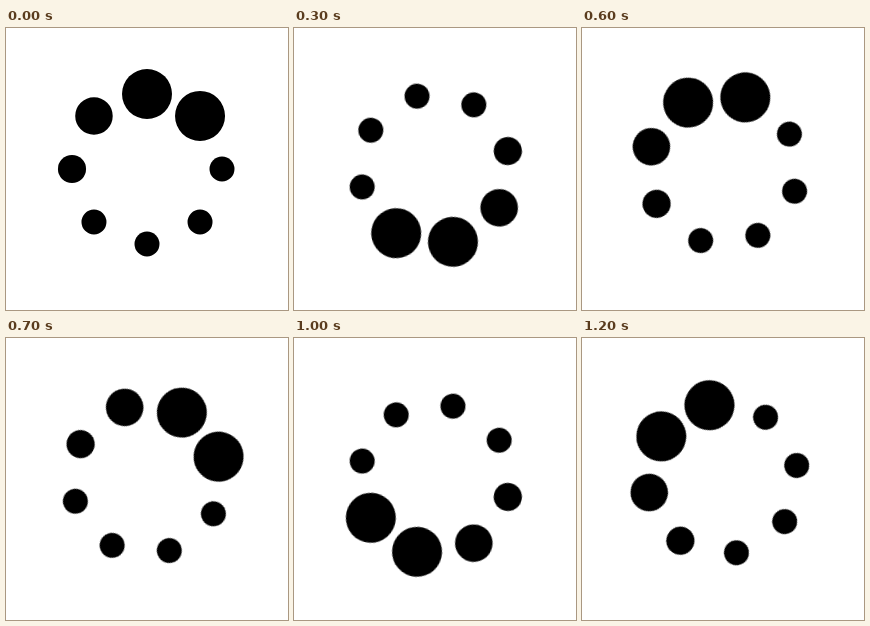
An HTML page without scripts for the animation above (1300 ms loop, 282 by 282 pixels).

```html
<!DOCTYPE html>
<html lang="en">
<head>
<meta charset="utf-8">
<title>Loading</title>
<style>
  html, body { margin: 0; width: 100%; height: 100%; overflow: hidden; background: #fff; }
  svg { display: block; width: 100%; height: 100%; }
  /* two turns in 13 held steps; the tiny lead avoids rounding at step edges */
  .ring { transform-origin: 0 0; animation: spin 1300ms steps(13) -0.1ms infinite; }
  @keyframes spin { to { transform: rotate(720deg); } }
</style>
</head>
<body>
<svg viewBox="-141 -141 282 282">
  <g class="ring">
    <circle cy="-75" r="25"/>
    <circle cy="-75" r="25" transform="rotate(45)"/>
    <circle cy="-75" r="12.5" transform="rotate(90)"/>
    <circle cy="-75" r="12.5" transform="rotate(135)"/>
    <circle cy="-75" r="12.5" transform="rotate(180)"/>
    <circle cy="-75" r="12.5" transform="rotate(225)"/>
    <circle cy="-75" r="14.06" transform="rotate(270)"/>
    <circle cy="-75" r="18.75" transform="rotate(315)"/>
  </g>
</svg>
</body>
</html>
```
